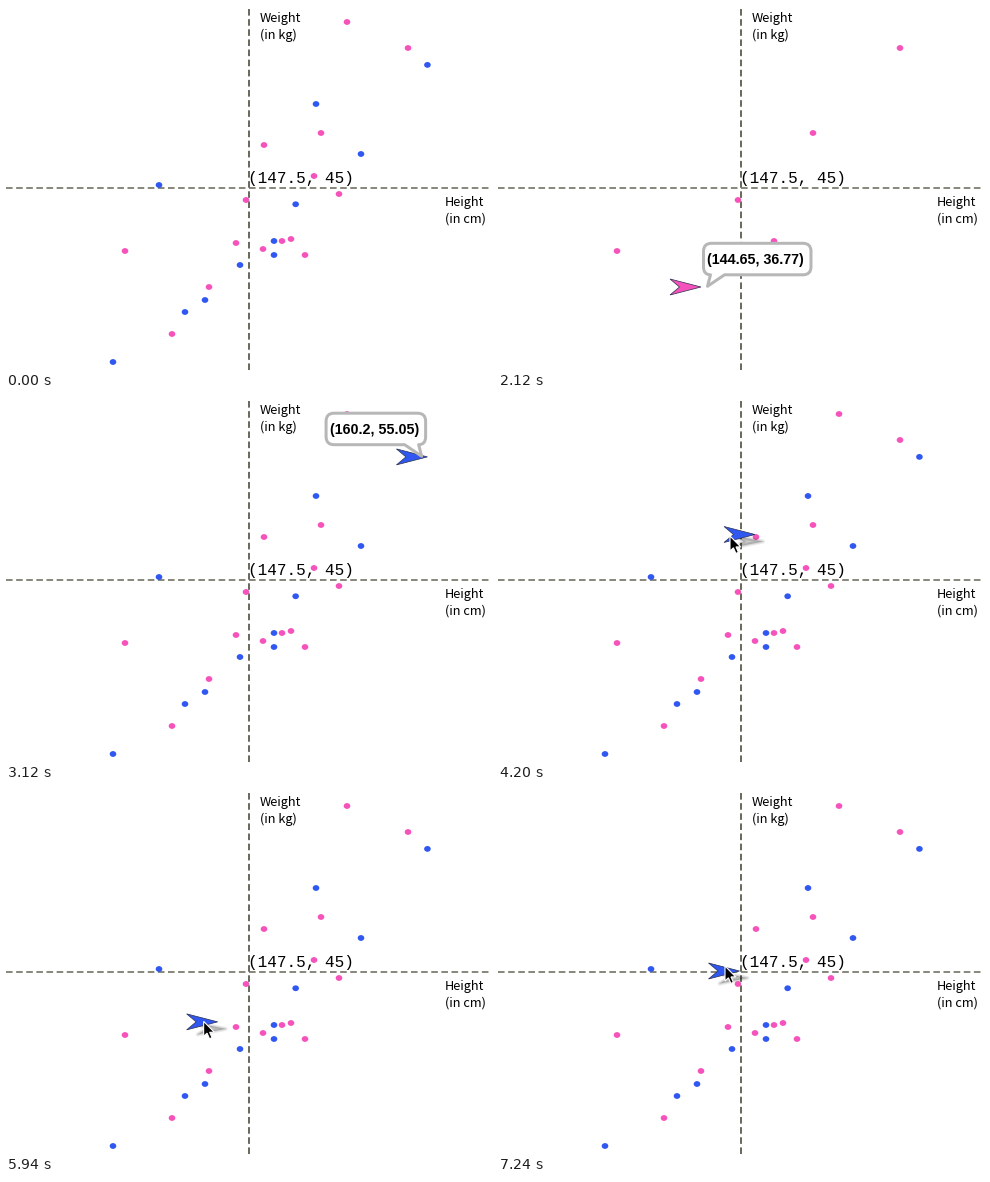
Write a matplotlib script that moves like this. It is 486 px wide and 364 px high and loops after 8 s.

```python
import numpy as np
import matplotlib.pyplot as plt
from matplotlib.animation import FuncAnimation
from matplotlib.patches import Ellipse, PathPatch, Polygon
from matplotlib.path import Path

W, H = 486, 364
LOOP, STEP = 8000, 20
BLUE, PINK, AXIS = "#3058f0", "#f553bb", "#6c6c5e"
CX, CY = 243, 181      # where 147.5 cm and 45 kg meet
PX_CM, PX_KG = 14.05, 12.15

CLEAR, V_AXIS, H_AXIS, LABEL, PLOT = 500, 1520, 1620, 1720, 1820
DOT_MS = 50

# the plotted measurements, in stage pixels
GIRLS = [(257, 243), (119, 245), (315, 127), (240, 194), (276, 235),
         (402, 42), (203, 281), (333, 188), (230, 237), (308, 170),
         (341, 16), (166, 328), (299, 249), (258, 139), (285, 233)]
BOYS = [(289.65, 198.25), (268, 235), (153, 179), (355, 148), (199, 294),
        (30, 430), (107, 356), (234, 259), (310, 98), (268, 249),
        (179, 306), (421.43, 58.9)]
DOTS = [(p, PINK) for p in GIRLS] + [(p, BLUE) for p in BOYS]
PLOT_END = PLOT + DOT_MS * len(DOTS)

# hand drags: start ms, stop ms, where the tip goes, pointer offset from the tip
DRAGS = [(3840, 4200, (257, 136.5), (-25, 1.5)),
         (4660, 5040, (157, 179), (-25, 1.5)),
         (5700, 6240, (227, 238), (-14, -0.5)),
         (6740, 7240, (241.5, 181), (-14.5, -5))]
DROP = 5180
ENTER, ARRIVE, ENTRY = 3270, 3700, (78, 27)


def glide(t, t0, t1, a, b, bow=0.1):
    """Ease out from a to b along a slightly bowed path."""
    a, b = np.array(a, float), np.array(b, float)
    e = 1 - (1 - np.clip((t - t0) / (t1 - t0), 0, 1)) ** 3
    dx, dy = b - a
    return a + (b - a) * e + 4 * e * (1 - e) * bow * np.array([-dy, dx])


def hand(t):
    """Tip of the arrow and the pointer position at time t."""
    tip = np.array(BOYS[-1])
    grip = np.array(DRAGS[0][3])
    if t < DRAGS[0][0]:
        return tip, glide(t, ENTER, ARRIVE, ENTRY, tip + grip, 0)
    for start, stop, goal, hold in DRAGS:
        if t >= start:
            tip, grip = glide(t, start, stop, tip, goal), hold
    if DROP <= t < DRAGS[2][0]:
        grip = DRAGS[2][3]
    return tip, tip + grip


fig = plt.figure(figsize=(W / 72, H / 72), dpi=72, facecolor="white")
ax = fig.add_axes([0, 0, 1, 1])
ax.set_xlim(0, W)
ax.set_ylim(H, 0)
ax.axis("off")


def text(x, y, s, font, size, z=1, **kw):
    return ax.text(x, y, s, family=font, size=size, va="baseline",
                   color="black", zorder=z, **kw)


def dashes(xs, ys, lw):
    line, = ax.plot(xs, ys, color=AXIS, lw=lw, zorder=1, dash_capstyle="butt")
    line.set_dashes([6.6 / lw, 3.525 / lw])
    return line


def shape(points, z, **kw):
    return ax.add_patch(Polygon(points, closed=True, zorder=z, **kw))


for x, y, name, unit in ((254, 16, "Weight", "(in kg)"),
                         (439, 200, "Height", "(in cm)")):
    text(x, y, name, "Noto Sans CJK JP", 12.8)
    text(x, y + 17, unit, "Noto Sans CJK JP", 12.8)

v_axis = dashes([CX, CX], [H, 3], 2)
h_axis = dashes([0, 483], [182, 182], 1.6)
label = text(242.2, 177.5, "(147.5, 45)", "Liberation Mono", 16.1, 2)
dots = [ax.add_patch(Ellipse(p, 6.6, 5.8, color=c, lw=0, zorder=3))
        for p, c in DOTS]

ARROW = np.array([(0, 0), (-31, -8), (-21.5, 0), (-31, 8)])
POINTER = np.array([(0, 0), (0, 15), (3.4, 11.8), (5.9, 17.4), (8.4, 16.3),
                    (6, 10.9), (10.7, 10.9)])
shadows = [shape(ARROW, 5, fc="black", ec="black", lw=w, alpha=0.08,
                 joinstyle="round") for w in (0, 2, 4)]
arrow = shape(ARROW, 6, fc=BLUE, ec="#2b2f4d", lw=0.7)
pointer = shape(POINTER, 9, fc="black", ec="white", lw=1.1)
bubble = ax.add_patch(PathPatch(Path([(0, 0)]), fc="white", ec="#b7b7b7",
                                lw=3, joinstyle="round", zorder=7))
speech = text(0, 0, "", "Liberation Sans", 14.3, 8, weight="bold")


def bubble_path(w, h=31.5, r=8):
    pts = [(r, 0), (w - r, 0), (w, 0), (w, r), (w, h - r), (w, h), (w - r, h),
           (21, h), (4, h + 11.5), (7, h), (0, h), (0, h - r), (0, r), (0, 0), (r, 0)]
    M, L, C = Path.MOVETO, Path.LINETO, Path.CURVE3
    return np.array(pts), [M, L, C, C, L, C, C, L, L, L, C, C, L, C, C]


def say(x, y):
    cm = 147.5 + (x - CX) / PX_CM
    kg = 45 + (CY - y) / PX_KG
    s = f"({round(cm, 2):g}, {round(kg, 2):g})"
    digits = sum(ch.isdigit() for ch in s)
    w = 10.5 + 14.3 * (0.667 + 0.556 * digits + 0.278 * (len(s) - digits - 2))
    pts, codes = bubble_path(w)
    left = x + 2.5
    if left + w > W:  # flip to the other side at the stage edge
        left = x - 1.8 - w
        pts[:, 0] = w - pts[:, 0]
    top = np.clip(y - 43.7, 1.5, H - 44)
    bubble.set_path(Path(pts + (left, top), codes))
    speech.set_text(s)
    speech.set_position((left + 3.5, top + 20.8))


def draw(i):
    now = i * STEP
    t = now + STEP // 2
    early = t < CLEAR
    for art, start in ((v_axis, V_AXIS), (h_axis, H_AXIS), (label, LABEL)):
        art.set_visible(early or t >= start)

    done = (t - PLOT) // DOT_MS
    for k, dot in enumerate(dots):
        dot.set_visible(early or k < done)

    tip, at = hand(now)
    colour = BLUE
    plotting = PLOT <= t < PLOT_END
    bubble.set_visible(plotting)
    speech.set_visible(plotting)
    if plotting:
        tip, colour = DOTS[done]
        say(*tip)

    arrow.set_visible(t >= PLOT)
    arrow.set_facecolor(colour)
    arrow.set_xy(ARROW + tip)

    held = DRAGS[0][0] <= t < DROP or t >= DRAGS[2][0]
    for sh in shadows:
        sh.set_visible(held)
        sh.set_xy(ARROW * (0.9, 0.7) + tip + (8, 7))

    pointer.set_visible(t >= ENTER)
    pointer.set_xy(POINTER + at)
    return []


anim = FuncAnimation(fig, draw, frames=LOOP // STEP, interval=STEP,
                     init_func=lambda: draw(0), repeat=True, repeat_delay=0,
                     blit=False)
plt.show()
```
